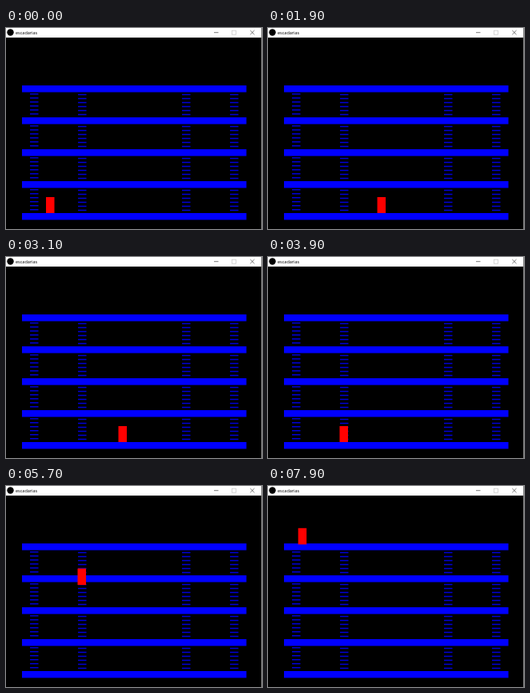
An HTML page with a canvas for the animation above (8 s loop, 320 by 252 pixels).

```html
<!DOCTYPE html>
<html lang="pt">
<head>
<meta charset="utf-8">
<title>escadarias</title>
<style>
  html, body { margin: 0; width: 320px; height: 252px; overflow: hidden; background: #000; }
  canvas { display: block; }
</style>
</head>
<body>
<canvas id="stage" width="320" height="252"></canvas>
<script>
const ctx = document.getElementById('stage').getContext('2d');
const LOOP = 8000, STEP = 100;
const GROUND = 232, STOREY = 40, FLOORS = 5;
const EDGE = 0.5; // outline added to every block

function rect(color, x, y, w, h) {
  ctx.fillStyle = color;
  ctx.fillRect(x, y, w, h);
}

function block(color, x, y, w, h) {
  rect(color, x, y, w + EDGE, h + EDGE);
}

function line(x1, y1, x2, y2) {
  ctx.beginPath();
  ctx.moveTo(x1, y1);
  ctx.lineTo(x2, y2);
  ctx.stroke();
}

function titleBar() {
  rect('#fff', 0, 0, 320, 12);
  ctx.fillStyle = '#000';
  ctx.beginPath();
  ctx.arc(5.5, 5.5, 4.2, 0, Math.PI * 2);
  ctx.fill();
  ctx.font = '5.5px "Open Sans", sans-serif';
  ctx.fillText('escadarias', 12, 7.7);
  ctx.lineWidth = 0.8;
  ctx.strokeStyle = '#555';
  line(260, 5.7, 265.5, 5.7);
  line(305.3, 3, 310.5, 8.2);
  line(310.5, 3, 305.3, 8.2);
  ctx.strokeStyle = '#ccc';
  ctx.strokeRect(282.5, 3.2, 5, 5);
}

function ladder(x, top) {
  for (let i = 0; i < 6; i++) block('#0000d8', x, top + i * 5, 10, 1);
}

function building() {
  for (let i = 0; i < FLOORS; i++) {
    const y = GROUND - i * STOREY;
    block('#00f', 20, y, 280, 8);
    if (i === 0) continue;
    ladder(30, y + 10);
    for (const x of [90, 220, 280]) ladder(x, y + 10.75);
  }
}

// 0 before start, 1 after end, linear between
function ramp(t, start, end) {
  return Math.min(1, Math.max(0, (t - start) / (end - start)));
}

function player(t) {
  const right = 53.5 * ramp(t, 500, 1400) + 33.1 * ramp(t, 1400, 1900)
    + 37.9 * ramp(t, 1900, 2600);
  const left = 85 * ramp(t, 2600, 3850) + 51.8 * ramp(t, 7100, 7900);
  const up = 71 * ramp(t, 3930, 5000) + 37.5 * ramp(t, 5000, 5700)
    + 50.7 * ramp(t, 6300, 7100);
  const y = GROUND - 20 - up;
  rect('#f00', 50 + right - left, y, 10 + EDGE, Math.min(20 + EDGE, GROUND - y));
}

function draw(now) {
  const t = Math.floor(now % LOOP / STEP) * STEP;
  rect('#000', 0, 0, 320, 252);
  titleBar();
  building();
  player(t);
  rect('#808080', 319, 0, 1, 252);
}

const start = performance.now();
function tick() {
  draw(performance.now() - start);
  requestAnimationFrame(tick);
}
tick();
</script>
</body>
</html>
```
